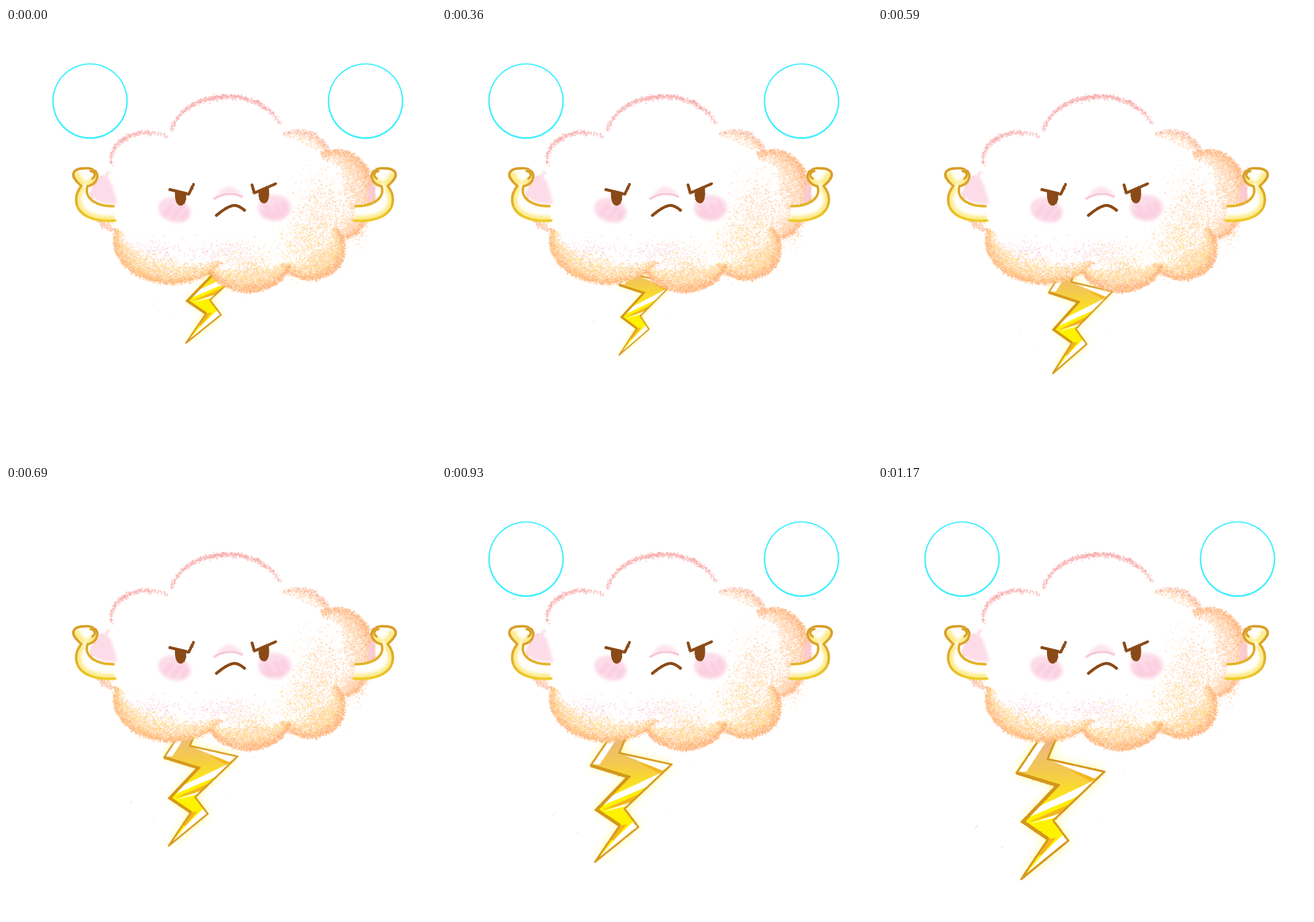
Animation of 748x748 px, one loop 1400 ms. Source, as an HTML page with a canvas:

```html
<!DOCTYPE html>
<html lang="en">
<head>
<meta charset="utf-8">
<title>Angry storm cloud</title>
<style>
  html, body { margin: 0; width: 100%; height: 100%; overflow: hidden; background: #fff; }
  svg, canvas { position: absolute; left: 0; top: 0; width: 100%; height: 100%; display: block; }

  .bolt { animation: strike 1400ms step-end infinite; }
  .rings { animation: blink 1400ms step-end infinite; }

  @keyframes strike {
    0%      { transform: matrix(.745, 0, 0, .733, 313, 548); }
    16.42%  { transform: matrix(.612, -.01, -.0265, .66, 308, 569); }
    32.85%  { transform: matrix(.725, 0, .0065, .762, 304, 601); }
    49.28%  { transform: matrix(.835, 0, .007, .832, 283, 626); }
    66.42%  { transform: matrix(.92, 0, 0, .908, 266, 654); }
    83.57%, 100% { transform: matrix(1, 0, 0, 1, 249, 684); }
  }
  @keyframes blink {
    0%, 25.71%, 54.28%, 83.57%, 100% { opacity: 1; }
    16.42%, 42.14%, 71.42% { opacity: 0; }
  }
</style>
</head>
<body>
<svg viewBox="0 0 748 748">
  <defs>
    <linearGradient id="boltFill" gradientUnits="userSpaceOnUse" x1="0" y1="-250" x2="0" y2="-120">
      <stop offset="0" stop-color="#e8b38c"/>
      <stop offset=".5" stop-color="#f5ca4c"/>
      <stop offset="1" stop-color="#fff200"/>
    </linearGradient>
    <filter id="glow" x="-40%" y="-30%" width="180%" height="160%">
      <feGaussianBlur stdDeviation="9"/>
    </filter>
    <filter id="roughBolt" x="-10%" y="-10%" width="120%" height="120%" color-interpolation-filters="sRGB">
      <feTurbulence type="fractalNoise" baseFrequency=".35" numOctaves="2" seed="4"/>
      <feDisplacementMap in="SourceGraphic" scale="2" xChannelSelector="R" yChannelSelector="G"/>
    </filter>
    <path id="boltShape" d="M52-274L-8-185L63-163L3-100L47-70L0 0L82-67L56-102L145-187L46-209L73-274Z"/>
  </defs>

  <g class="bolt">
    <use href="#boltShape" fill="#fff76a" opacity=".8" filter="url(#glow)"/>
    <g filter="url(#roughBolt)">
      <use href="#boltShape" fill="url(#boltFill)"/>
      <path fill="#f4b51c" d="M85-190L132-177L122-169ZM92-134L70-114L12-99ZM47-70L60-72L36-42L30-42Z"/>
      <path fill="#fff" d="M54-274L-5-187L9-187L66-274ZM48-208L143-187L128-175ZM129-173L105-147L14-108L32-127Z
        M74-117L62-108L14-96ZM72-77L80-67L4-4L38-44Z"/>
      <path fill="none" stroke="#cf8e10" stroke-width="6" d="M-8-185L63-163L3-100L47-70"/>
      <use href="#boltShape" fill="none" stroke="#d6981c" stroke-width="3.6" stroke-linejoin="round"/>
    </g>
    <path stroke="#e4ddc4" stroke-width="1.2" d="M-80-89l5-5M-34-55l2-2M179-185l2 0M130-100l2 0"/>
  </g>

  <g class="rings" fill="#40f0ff" fill-rule="evenodd">
    <path id="ring" d="M80.5 127.3a65.7 65.7 0 1 0 131.4 0a65.7 65.7 0 1 0-131.4 0M83 126.8a63.2 63.2 0 1 0 126.4 0a63.2 63.2 0 1 0-126.4 0"/>
    <use href="#ring" x="479.2"/>
  </g>
</svg>

<canvas id="cloud" width="748" height="748"></canvas>

<svg viewBox="0 0 748 748">
  <defs>
    <filter id="soft" x="-20%" y="-20%" width="140%" height="140%"><feGaussianBlur stdDeviation="2.4"/></filter>
    <filter id="rough" x="-10%" y="-10%" width="120%" height="120%" color-interpolation-filters="sRGB">
      <feTurbulence type="fractalNoise" baseFrequency=".4" numOctaves="2" seed="9"/>
      <feDisplacementMap in="SourceGraphic" scale="2" xChannelSelector="R" yChannelSelector="G"/>
    </filter>
    <linearGradient id="armLine" gradientUnits="userSpaceOnUse" x1="0" y1="255" x2="0" y2="338">
      <stop offset="0" stop-color="#d99f28"/>
      <stop offset=".6" stop-color="#e2b02a"/>
      <stop offset="1" stop-color="#f0cd2c"/>
    </linearGradient>
    <path id="armShape" d="M190 335C150 338 122 325 122 298C122 288 127 280 131 275C126 270 117 263 117 255
      C118 246 128 244 138 244C150 243 159 250 159 258C158 268 150 274 142 275C136 290 148 310 187 310"/>
    <clipPath id="armClip"><use href="#armShape"/></clipPath>
    <g id="arm">
      <use href="#armShape" fill="#fffefa"/>
      <g clip-path="url(#armClip)">
        <path d="M190 335C150 338 122 325 122 298C122 288 127 280 131 275M119 252Q122 266 135 275M142 275Q156 270 159 258"
          fill="none" stroke="#fcec8c" stroke-width="17" filter="url(#soft)"/>
      </g>
      <g filter="url(#rough)" fill="none" stroke="url(#armLine)" stroke-linecap="round" stroke-linejoin="round">
        <use href="#armShape" stroke-width="4.4"/>
        <path d="M147 249C155 251 157 258 150 262" stroke-width="3.6"/>
      </g>
    </g>
  </defs>

  <g filter="url(#soft)">
    <g fill="#fddce9">
      <ellipse cx="293" cy="317" rx="29" ry="21" transform="rotate(18 293 317)"/>
      <ellipse cx="467" cy="313" rx="29" ry="23"/>
      <path d="M364 294Q387 260 413 292Q386 282 364 294Z" opacity=".8"/>
      <path d="M160 262Q178 252 183 270Q190 290 194 306Q150 308 146 284Z"/>
      <path d="M638 262Q645 285 637 306Q626 300 631 280Z" fill="#f9cbd8"/>
    </g>
    <g fill="none" stroke="#fbcbde" stroke-width="9" stroke-linecap="round" opacity=".75">
      <path d="M277 324L288 311M291 329L305 312M307 331L313 321"/>
      <path d="M449 322Q462 331 480 325M453 311L460 321M470 309L475 321M482 306L486 317"/>
    </g>
  </g>
  <path d="M361 298Q386 281 412 294" fill="none" stroke="#f9c9db" stroke-width="4" filter="url(#rough)"/>

  <g filter="url(#rough)" fill="none" stroke="#8a4a17" stroke-width="5" stroke-linecap="round" stroke-linejoin="round">
    <path d="M285 281L318 289L326 272M428 273L432 287L469 271"/>
    <path d="M366 326Q386 309 398 308.5Q405 309 415 317"/>
    <path fill="#8a4a17" stroke="none" d="M294 283L313 287C315 299 311 309 304 309C296 309 293 297 294 283Z
      M440 283L457 276C459 292 457 305 449 305C441 305 438 294 440 283Z"/>
  </g>

  <use href="#arm"/>
  <use href="#arm" transform="translate(795) scale(-1 1)"/>
</svg>

<script>
  const ctx = document.getElementById('cloud').getContext('2d');
  let seed = 71;
  const random = () => (seed = (seed * 16807) % 2147483647) / 2147483647;
  const pick = list => list[Math.floor(random() * list.length)];
  const bell = () => random() + random() + random() - 1.5;

  const PINK = ['#f7a3a3', '#f9b0ae', '#f9bcbc'];
  const ROSE = ['#f9cfe0', '#fbd9e8', '#f8c6dc'];
  const CORAL = ['#f8ae97', '#fbb99f', '#f9c0b0'];
  const ORANGE = ['#ffad72', '#ffb983', '#fdb27c', '#ffc197'];
  const PEACH = ['#ffd3a8', '#ffdfc0', '#ffc99c', '#ffe3cc'];
  const WARM = [...PEACH, '#ffe48c', '#ffdc70'];

  // Angles in degrees, clockwise from the right; depth is how far the chalk reaches inward.
  const lobes = [
    { x: 384, y: 190, rx: 98, ry: 73, from: 188, to: 342, depth: 9, grain: .36, edge: PINK, inner: PINK },
    { x: 245, y: 228, rx: 63, ry: 48, from: 165, to: 305, depth: 8, grain: .27, edge: PINK, inner: PINK },
    { x: 195, y: 300, rx: 48, ry: 52, from: 165, to: 255, depth: 14, grain: .16, edge: CORAL, inner: ROSE },
    { x: 195, y: 300, rx: 48, ry: 54, from: 95, to: 175, depth: 30, grain: .2, edge: CORAL, inner: PEACH },
    { x: 508, y: 228, rx: 56, ry: 50, from: -120, to: 0, depth: 30, grain: .17, edge: CORAL, inner: PEACH },
    { x: 575, y: 290, rx: 66, ry: 78, from: -115, to: 85, depth: 66, grain: .23, edge: ORANGE, inner: PEACH },
    { x: 288, y: 370, rx: 100, ry: 75, from: 30, to: 196, depth: 58, grain: .25, edge: [...ORANGE, '#ffcf78'], inner: WARM },
    { x: 530, y: 384, rx: 60, ry: 54, from: -45, to: 150, depth: 60, grain: .25, edge: ORANGE, inner: WARM },
    { x: 422, y: 400, rx: 74, ry: 59, from: 10, to: 160, depth: 62, grain: .27, edge: ORANGE, inner: WARM }
  ];

  function dot(x, y, color, alpha) {
    const size = .8 + random() * 1.7;
    ctx.globalAlpha = alpha;
    ctx.fillStyle = color;
    ctx.fillRect(x - size / 2, y - size / 2, size, size);
  }

  function fillWhite(x, y, rx, ry) {
    ctx.fillStyle = '#fff';
    ctx.beginPath();
    ctx.ellipse(x, y, rx, ry, 0, 0, 7);
    ctx.fill();
  }

  // Chalk thins out toward both ends of the arc and toward the middle of the lobe.
  function chalkEdge({ x, y, rx, ry, from, to, depth, grain, edge, inner }) {
    const start = from * Math.PI / 180;
    const sweep = (to - from) * Math.PI / 180;
    const count = sweep * (rx + ry) / 2 * depth * grain * 2;
    for (let i = 0; i < count; i++) {
      const u = random();
      const taper = .25 + .75 * Math.sin(Math.PI * u);
      if (random() > taper) continue;
      const angle = start + sweep * u;
      const t = 1 - Math.cbrt(random());
      const inset = t * depth * taper + bell() * 3.5;
      const color = random() > t * 3 ? pick(edge) : pick(inner);
      dot(x + (rx - inset) * Math.cos(angle), y + (ry - inset) * Math.sin(angle), color, .4 + random() * .4);
    }
  }

  function chalkPatch(x, y, rx, ry, count, colors) {
    for (let i = 0; i < count; i++) dot(x + rx * bell(), y + ry * bell(), pick(colors), .6);
  }

  fillWhite(385, 300, 190, 122);
  lobes.forEach(({ x, y, rx, ry }) => fillWhite(x, y, rx - 2, ry - 2));
  chalkPatch(375, 392, 65, 26, 350, ROSE);
  chalkPatch(255, 388, 50, 22, 220, ROSE);
  chalkPatch(552, 325, 55, 65, 1300, PEACH);
  chalkPatch(528, 378, 50, 45, 1000, WARM);
  chalkPatch(430, 412, 70, 32, 500, WARM);
  chalkPatch(602, 345, 26, 28, 500, PEACH);
  lobes.forEach(chalkEdge);
</script>
</body>
</html>
```
